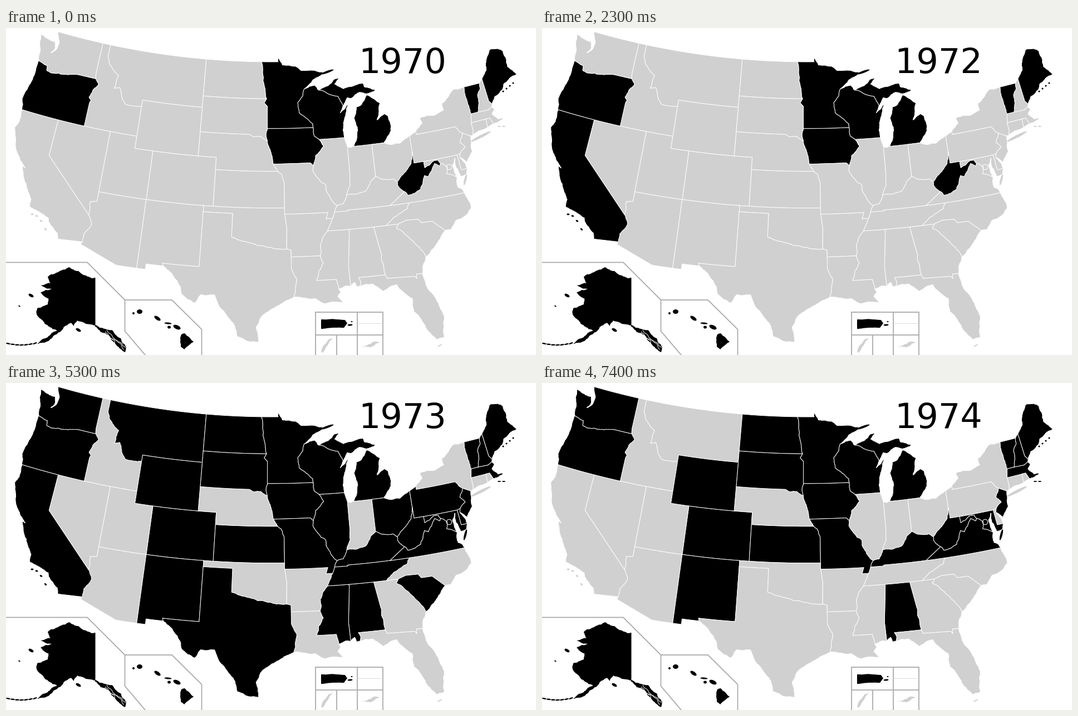
A matplotlib script for the animation above (8000 ms loop, 952 by 588 pixels).

```python
import math
import random

import matplotlib.pyplot as plt
from matplotlib.animation import FuncAnimation
from matplotlib.patches import Circle, Ellipse, Polygon

W, H, DPI = 952, 588, 64
PX = 72 / DPI  # points per pixel
GREY, BLACK, FRAME = "#d0d0d0", "#000000", "#aaaaaa"

rng = random.Random(7)
arcs = []    # (state codes, pixel points) pieces of border or coast
shapes = []  # (state code, patch)

fig = plt.figure(figsize=(W / DPI, H / DPI), dpi=DPI, facecolor="white")
ax = fig.add_axes([0, 0, 1, 1])
ax.set_xlim(0, W)
ax.set_ylim(H, 0)
ax.axis("off")

# Albers equal-area conic with the usual parallels for the lower 48 states
S1, S2 = (math.sin(math.radians(a)) for a in (29.5, 45.5))
CONE = (S1 + S2) / 2


def project(west, north):
    """Degrees west and north to stage pixels."""
    sin_lat = math.sin(math.radians(north))
    r = 1251 * math.sqrt(1 + S1 * S2 - 2 * CONE * sin_lat) / CONE
    turn = CONE * math.radians(96 - west)
    return 476.5 + r * math.sin(turn), -1317.6 + r * math.cos(turn)


def pairs(xy):
    return list(zip(xy[::2], xy[1::2]))


def split(a, b, k):
    """Midpoint displacement from a to b, leaving out a."""
    if math.dist(a, b) < 3:
        return [b]
    d = rng.uniform(-k, k)
    mid = ((a[0] + b[0]) / 2 - d * (b[1] - a[1]),
           (a[1] + b[1]) / 2 + d * (b[0] - a[0]))
    return split(a, mid, k) + split(mid, b, k)


def rough(pts, k):
    out = [pts[0]]
    for a, b in zip(pts, pts[1:]):
        out += split(a, b, k)
    return out


def edge(codes, *degrees, k=0):
    pts = [project(*p) for p in pairs(degrees)]
    arcs.append((codes.split(), rough(pts, k)))


def wavy(codes, *degrees):
    edge(codes, *degrees, k=0.08)


def runs(stops):
    return zip(stops[::2], stops[1::2], stops[2::2])


def parallel(lat, *stops):
    for a, codes, b in runs(stops):
        pts = [project(a + (b - a) * i / 12, lat) for i in range(13)]
        arcs.append((codes.split(), pts))


def meridian(lon, *stops):
    for a, codes, b in runs(stops):
        edge(codes, lon, a, lon, b)


def ring(code):
    """Chain every arc of a state into one outline."""
    parts = [pts for codes, pts in arcs if code in codes]
    path = list(parts.pop(0))
    while parts:
        end = path[-1]
        part = min(parts, key=lambda p: min(math.dist(end, p[0]),
                                            math.dist(end, p[-1])))
        parts.remove(part)
        if math.dist(end, part[0]) > math.dist(end, part[-1]):
            part = part[::-1]
        path += part
    return path


def add(code, patch):
    shapes.append((code, ax.add_patch(patch)))


def land(code, *xy, k=0.08):
    add(code, Polygon(rough(pairs(xy), k), lw=0, zorder=2))


def isle(code, x, y, w, h, tilt=0):
    add(code, Ellipse((x, y), w, h, angle=tilt, lw=0, zorder=2))


def stroke(color, width, *xy, k=0):
    x, y = zip(*rough(pairs(xy), k))
    ax.plot(x, y, color=color, lw=width * PX, zorder=3,
            solid_joinstyle="miter", solid_capstyle="butt")


# Borders along parallels
parallel(49, 122.75, "wa", 117.03, "id", 116.05, "mt", 104.05, "nd", 97.23,
         "mn", 95.15)
parallel(45.94, 104.05, "nd sd", 96.56)
parallel(46, 118.98, "wa or", 116.92)
parallel(45.01, 73.34, "vt", 71.5)
parallel(45, 111.05, "mt wy", 104.05)
parallel(43.5, 96.45, "ia mn", 91.22)
parallel(43, 104.05, "sd ne", 98.5)
parallel(42.74, 73.27, "vt ma", 72.46)
parallel(42.5, 90.64, "wi il", 87.8)
parallel(42.03, 73.5, "ma ct", 71.8, "ma ri", 71.38)
parallel(42, 124.21, "or ca", 120, "or nv", 117.03, "nv id", 114.05, "id ut",
         111.05)
parallel(42, 79.76, "ny pa", 75.35)
parallel(41.72, 86.82, "in mi", 84.81, "mi oh", 83.45)
parallel(41, 111.05, "ut wy", 109.05, "wy co", 104.05, "ne co", 102.05)
parallel(41, 73.9, "ny", 73.65)
parallel(40, 102.05, "ne ks", 95.31)
parallel(39.72, 80.52, "wv pa", 79.48, "pa md", 75.79)
parallel(38.46, 75.69, "md de", 75.05)
parallel(37, 114.05, "ut az", 109.05, "co nm", 103.03, "co ok", 102.05,
         "ks ok", 94.62)
parallel(36.58, 88.07, "ky tn", 83.68, "tn va", 81.68, "va nc", 75.87)
parallel(36.5, 103.03, "ok tx", 100)
parallel(36.5, 94.62, "mo ar", 90.15)
parallel(36.5, 89.45, "ky tn", 88.07)
parallel(36, 90.37, "mo ar", 89.7)
parallel(35, 90.3, "ms tn", 88.2, "al tn", 85.6, "tn ga", 84.32, "ga nc", 83.1)
parallel(33, 94.04, "ar la", 91.16)
parallel(32, 106.62, "nm tx", 103.05)
parallel(31.78, 108.21, "nm", 106.53)
parallel(31.33, 111.07, "az", 109.05, "nm", 108.21)
parallel(31, 91.63, "ms la", 89.73)
parallel(31, 87.6, "al fl", 85)

# Borders along meridians
meridian(120, 42, "ca nv", 39)
meridian(117.03, 49, "wa id", 46.4)
meridian(117.03, 43.8, "or id", 42)
meridian(116.05, 49, "id mt", 48)
meridian(114.05, 42, "nv ut", 37, "nv az", 36.2)
meridian(111.05, 45, "mt wy", 44.47, "id wy", 42, "ut wy", 41)
meridian(109.05, 41, "ut co", 37, "az nm", 31.33)
meridian(108.21, 31.78, "nm", 31.33)
meridian(104.05, 49, "mt nd", 45.94, "mt sd", 45, "wy sd", 43, "wy ne", 41)
meridian(103.04, 37, "nm ok", 36.5, "nm tx", 32)
meridian(102.05, 41, "ne co", 40, "co ks", 37)
meridian(100, 36.5, "ok tx", 34.56)
meridian(96.45, 45.3, "sd mn", 43.5)
meridian(94.62, 39.11, "ks mo", 37, "ok mo", 36.5)
meridian(94.04, 33.55, "ar tx", 33, "la tx", 32)
meridian(87.53, 41.71, "il in", 39.35)
meridian(84.81, 41.72, "in oh", 39.1)
meridian(80.52, 41.98, "oh pa", 40.64, "wv pa", 39.72)
meridian(79.76, 42.27, "ny pa", 42)
meridian(79.48, 39.72, "wv md", 39.2)

# Slanting borders
edge("ca nv", 120, 39, 114.63, 35)
edge("ca", 117.12, 32.53, 114.72, 32.72)
edge("az", 114.72, 32.72, 114.81, 32.5, 111.07, 31.33)
edge("nm tx", 106.53, 31.78, 106.62, 32)
edge("sd mn", 96.45, 45.3, 96.84, 45.6, 96.56, 45.94)
edge("ok ar", 94.48, 33.64, 94.43, 35.39, 94.62, 36.5)
edge("ar tx", 94.04, 33.55, 94.48, 33.64)
edge("mo ar", 90.37, 36, 90.15, 36.5)
edge("ia mo", 95.77, 40.58, 91.73, 40.61, 91.42, 40.38)
edge("il", 87.8, 42.5, 87.53, 41.71)
edge("va ky", 83.68, 36.58, 81.97, 37.54)
edge("ms al", 88.4, 30.35, 88.47, 31.9, 88.1, 34.9, 88.2, 35)
edge("al ga", 85.6, 35, 85.18, 32.87)
edge("ga fl", 85, 31, 84.86, 30.7, 82.2, 30.57)
edge("nc sc", 83.1, 35, 82.3, 35.2, 81.04, 35.15, 80.78, 34.82, 79.67, 34.8,
     78.55, 33.86)
edge("md de", 75.79, 39.72, 75.69, 38.46)
edge("nj ny", 74.7, 41.36, 73.9, 41)
edge("ny ma", 73.27, 42.74, 73.5, 42.03)
edge("ny ct", 73.5, 42.03, 73.5, 41.3, 73.65, 41)
edge("nh me", 71.08, 45.3, 70.98, 43.4, 70.7, 43.07)
edge("nh ma", 72.46, 42.74, 71.3, 42.7, 70.82, 42.87)
edge("ma ri", 71.12, 41.5, 71.38, 42.03)
edge("ct ri", 71.8, 42.03, 71.85, 41.32)

# Rivers and ridges
wavy("wa id", 117.03, 46.4, 116.92, 46)
wavy("wa or", 118.98, 46, 120.65, 45.73, 122.2, 45.56, 122.76, 45.65,
     122.85, 46.05, 124, 46.25)
wavy("or id", 116.92, 46, 116.47, 45.6, 117.22, 44.4, 116.93, 44.2,
     117.03, 43.8)
wavy("ca az", 114.63, 35, 114.14, 34.3, 114.72, 33.4, 114.72, 32.72)
wavy("nv az", 114.63, 35, 114.72, 36.08, 114.05, 36.2)
wavy("id mt", 116.05, 48, 115.7, 47.45, 114.35, 46.65, 114.55, 45.56,
     113.95, 45.7, 113, 44.45, 111.05, 44.47)
wavy("ok tx", 100, 34.56, 98.1, 34.13, 96.6, 33.85, 94.48, 33.64)
wavy("ks mo", 94.62, 39.11, 94.9, 39.75, 95.31, 40)
wavy("ne mo", 95.31, 40, 95.77, 40.58)
wavy("ne ia", 95.77, 40.58, 96.1, 41.7, 96.45, 42.49)
wavy("sd ia", 96.45, 42.49, 96.6, 43, 96.45, 43.5)
wavy("sd ne", 98.5, 43, 97.9, 42.8, 97.2, 42.85, 96.45, 42.49)
wavy("nd mn", 96.56, 45.94, 96.8, 46.9, 97.23, 49)
wavy("mn wi", 92.05, 46.7, 92.29, 46.1, 92.88, 45.6, 92.75, 44.75, 91.25, 43.8,
     91.22, 43.5)
wavy("wi ia", 91.22, 43.5, 91.1, 42.75, 90.64, 42.5)
wavy("ia il", 90.64, 42.5, 90.16, 41.9, 91.1, 41.2, 91.42, 40.38)
wavy("il mo", 91.42, 40.38, 91.5, 40, 90.7, 39, 90.2, 38.75, 90.2, 38.3,
     89.52, 37.3, 89.15, 37)
wavy("il ky", 89.15, 37, 88.5, 37.1, 88.05, 37.82)
wavy("il in", 87.53, 39.35, 87.6, 38.6, 88.05, 37.82)
wavy("in ky", 88.05, 37.82, 87.1, 37.8, 86, 38, 85.42, 38.7, 84.81, 39.1)
wavy("oh ky", 84.81, 39.1, 84.2, 38.8, 83, 38.7, 82.59, 38.42)
wavy("oh wv", 82.59, 38.42, 81.8, 39, 80.85, 39.7, 80.52, 40.64)
wavy("wi mu", 90.42, 46.56, 89.1, 46.13, 88.1, 45.9, 87.6, 45.1)
wavy("ky mo", 89.15, 37, 89.45, 36.5)
wavy("mo tn", 89.45, 36.5, 89.7, 36)
wavy("ar tn", 89.7, 36, 90.3, 35)
wavy("ar ms", 90.3, 35, 91.1, 33.95, 91.16, 33)
wavy("ms la", 91.16, 33, 90.9, 32.4, 91.63, 31)
wavy("ms la", 89.73, 31, 89.55, 30.18)
wavy("la tx", 94.04, 32, 93.55, 31.2, 93.7, 30.1, 93.85, 29.7)
wavy("al ga", 85.18, 32.87, 85.05, 31.6, 85, 31)
wavy("al fl", 87.6, 31, 87.4, 30.65, 87.52, 30.28)
wavy("ga fl", 82.2, 30.57, 82.05, 30.36, 82, 30.75, 81.45, 30.71)
wavy("ga sc", 80.85, 32.03, 81.5, 33, 81.95, 33.5, 83.35, 34.7, 83.1, 35)
wavy("tn nc", 81.68, 36.58, 82, 36.1, 83.5, 35.57, 84.32, 35)
wavy("wv ky", 82.59, 38.42, 82.6, 38.1, 81.97, 37.54)
wavy("va wv", 81.97, 37.54, 81.68, 37.2, 80.3, 37.5, 79.65, 38.58,
     79.25, 38.42, 78.35, 39.4, 77.83, 39.13, 77.72, 39.32)
wavy("wv md", 79.48, 39.2, 78.4, 39.62, 77.9, 39.6, 77.72, 39.32)
wavy("va md", 77.72, 39.32, 77.1, 38.95, 77.3, 38.4, 76.3, 37.95)
wavy("pa de", 75.79, 39.72, 75.41, 39.8)
wavy("pa nj", 75.41, 39.8, 74.75, 40.2, 75.2, 40.7, 74.7, 41.36)
wavy("ny pa", 75.35, 42, 75.05, 41.6, 74.7, 41.36)
wavy("ny vt", 73.34, 45.01, 73.4, 44.1, 73.27, 42.74)
wavy("vt nh", 71.5, 45.01, 71.6, 44.5, 72.05, 44.1, 72.46, 42.74)

# Coasts and national borders
wavy("wa", 124, 46.25, 124.15, 47, 124.7, 48.38, 122.75, 48.14, 122.55, 47.6,
     122.9, 47.15, 122.4, 47.5, 122.25, 48.2, 122.75, 49)
wavy("or", 124.21, 42, 124.55, 42.84, 124.07, 44.6, 124, 46.25)
wavy("ca", 124.21, 42, 124.1, 41, 124.4, 40.44, 123.7, 38.95, 122.5, 37.8,
     122.1, 37.5, 122.45, 37.6, 121.9, 36.6, 120.65, 35.15, 120.62, 34.55,
     118.5, 34.03, 118.4, 33.75, 117.3, 33, 117.12, 32.53)
wavy("mn", 95.15, 49, 95.15, 49.38, 94.6, 48.72, 93, 48.6, 92.4, 48.25,
     89.6, 48, 92.05, 46.7)
wavy("wi", 92.05, 46.7, 90.75, 46.95, 90.42, 46.56)
wavy("wi", 87.6, 45.1, 88, 44.55, 86.97, 45.28, 87.75, 43.7, 87.8, 42.5)
wavy("mu", 90.42, 46.56, 89.2, 46.85, 88.4, 47.35, 87.75, 47.45, 88.4, 46.95,
     87.4, 46.5, 86.1, 46.67, 85, 46.77, 84.9, 46.48, 83.6, 46.1, 84.75, 45.88,
     85.5, 46.08, 86.6, 45.65, 87.05, 45.75, 87.6, 45.1)
wavy("mi", 83.45, 41.72, 82.5, 42.6, 82.6, 43.85, 82.95, 44.07, 83.9, 43.65,
     83.3, 45, 84.75, 45.78, 85.55, 45, 86.1, 44.9, 86.5, 44, 86.2, 43,
     86.82, 41.72)
wavy("in", 87.53, 41.71, 87.2, 41.63, 86.82, 41.72)
wavy("oh", 83.45, 41.72, 82.7, 41.5, 81.7, 41.5, 80.52, 41.98)
wavy("pa", 80.52, 41.98, 79.76, 42.27)
wavy("ny", 79.76, 42.27, 78.9, 42.8, 79.05, 43.27, 77.5, 43.27, 76.2, 43.55,
     76.3, 44.1, 74.7, 45, 73.34, 45.01)
wavy("nh", 71.5, 45.01, 71.08, 45.3)
wavy("me", 71.08, 45.3, 70.3, 45.9, 70, 46.7, 69.23, 47.46, 68.3, 47.35,
     67.8, 47.07, 67.79, 45.7, 67, 44.85, 68.8, 44.4, 69.1, 44, 70.2, 43.6,
     70.7, 43.07)
wavy("nh", 70.7, 43.07, 70.82, 42.87)
wavy("ma", 70.82, 42.87, 70.6, 42.65, 71, 42.3, 70.5, 41.77, 70, 41.78,
     70.2, 42.07, 69.95, 41.65, 71.12, 41.5)
wavy("ri", 71.12, 41.5, 71.4, 41.45, 71.85, 41.32)
wavy("ct", 71.85, 41.32, 72.9, 41.25, 73.65, 41)
wavy("nj", 73.9, 41, 74, 40.4, 74.1, 39.75, 74.9, 38.95, 75.55, 39.5,
     75.41, 39.8)
wavy("de", 75.41, 39.8, 75.55, 39.45, 75.1, 38.8, 75.05, 38.46)
wavy("md", 75.05, 38.46, 75.25, 38.03, 75.9, 37.95, 76.2, 38.8, 76.1, 39.5,
     76.5, 39, 76.45, 38.4, 76.3, 37.95)
wavy("va", 76.3, 37.95, 76.4, 37.1, 76, 36.9, 75.87, 36.58)
wavy("nc", 75.87, 36.58, 75.5, 35.25, 76.5, 34.65, 77.3, 34.5, 77.95, 33.87,
     78.55, 33.86)
wavy("sc", 78.55, 33.86, 79.15, 33.3, 79.9, 32.65, 80.85, 32.03)
wavy("ga", 80.85, 32.03, 81.3, 31.3, 81.45, 30.71)
wavy("fl", 81.45, 30.71, 80.55, 28.45, 80.05, 26.9, 80.4, 25.2, 81.1, 25.13,
     81.75, 25.95, 82.75, 27.7, 82.75, 28.8, 84.05, 30.1, 85.35, 29.68,
     86.3, 30.38, 87.52, 30.28)
wavy("al", 87.52, 30.28, 87.85, 30.25, 88, 30.65, 88.4, 30.35)
wavy("ms", 88.4, 30.35, 88.9, 30.4, 89.55, 30.18)
wavy("la", 89.55, 30.18, 89.4, 29.9, 89.7, 29.55, 89.15, 29.05, 90.1, 29.15,
     90.9, 29.05, 91.8, 29.5, 93.85, 29.7)
wavy("tx", 93.85, 29.7, 94.75, 29.35, 97, 28, 97.4, 27.2, 97.15, 25.95)
wavy("tx", 97.15, 25.95, 99.1, 26.4, 99.5, 27.5, 100.3, 28.3, 101.4, 29.77,
     102.7, 29.7, 103.2, 28.98, 104.5, 29.65, 105, 30.65, 106.53, 31.78)

for c in sorted({c for names, _ in arcs for c in names}):
    add(c, Polygon(ring(c), ec="white", lw=0.95 * PX, joinstyle="round"))

# Offshore islands
isle("mi", 577, 79, 24, 4, -20)
isle("ny", 853, 195, 40, 5, -27)
isle("va", 825, 273, 4, 20, 14)
isle("fl", 779, 571, 10, 2, -30)
for i in range(4):
    isle("ca", 47 + 8 * i, 335 + 3 * i * i, 5, 3, 15 * i)
    isle("me", 893 + 6 * i, 114 - 5 * i, 3, 3)
for x in (886, 894):
    isle("ma", x, 177, 6, 2)

# Alaska
land("ak", 160.5, 535, 138, 529, 128, 526, 122, 536, 117, 530, 92, 550,
     56, 568, 92, 544, 66, 526, 55, 514, 56, 504, 75, 497, 76, 486, 62, 476,
     82, 470, 62, 463, 80, 459, 75, 448, 90, 440, 113, 430, 130, 437,
     160.5, 449, k=0.12)
land("ak", 160, 534, 178, 541, 190, 543, 206, 558, 216, 574, 214, 583, 198, 570,
     184, 552, 160, 537, k=0.12)
for i in range(7):
    isle("ak", 52 - 8 * i, 567 + 3 * math.sin(i / 2), 8, 2.5, 5 * i - 20)
for x, y, size in [(45, 481, 10), (24, 500, 4), (65, 514, 6), (130, 543, 10)]:
    isle("ak", x, y, size, size / 2, 30)
for d in (-3, 0, 3):
    stroke("white", 0.9, 178 + d, 546 - d, 212 + d, 578 - d, k=0.15)

# Hawaii
for x, y, w, h, tilt in [(229, 513, 4, 4, 0), (240, 510, 10, 8, 0),
                         (272, 522, 13, 6, 35), (291, 531, 13, 3, 5),
                         (293, 538, 6, 5, 0), (307, 538, 14, 7, 25)]:
    isle("hi", x, y, w, h, tilt)
land("hi", 315, 551, 321, 549, 337, 564, 320, 578, 314, 573, 313, 557)

# Territories
land("pr", 566, 524, 609, 525, 613, 531, 607, 539, 566, 541, 566, 524, k=0.03)
isle("pr", 618, 534, 9, 3, -5)
isle("pr", 621, 528, 3, 2)
land("gu", 566, 582, 569, 573, 579, 560, 587, 557, 578, 570, 569, 584)
land("as", 638, 572, 655, 568, 661, 564, 671, 565, 655, 574)

# Barrier island and federal district
stroke("white", 0.9, 470, 516, 458, 526, 453, 540, 452, 556, k=0.05)
ax.add_patch(Circle((796, 250), 4.7, fill=False, ec="white", lw=PX, zorder=4))

# Inset frames
for pts in [(0, 421.5, 146, 421.5, 213.5, 489, 298, 489, 351.5, 542, 351.5, 588),
            (213.5, 489, 213.5, 545, 250, 588),
            (556, 589, 556, 511, 677, 511, 677, 589),
            (556, 551.5, 677, 551.5), (630.5, 511, 630.5, 588),
            (593.5, 551.5, 593.5, 588)]:
    stroke(FRAME, 1.8, *pts)
stroke("#dcdcdc", 1, 632, 530.5, 676, 530.5)

year = ax.text(633.2, 80.5, "", family="DejaVu Sans", size=62 * PX,
               va="baseline", ha="left", color=BLACK)

base = "or mn wi mi mu ia vt me wv ak hi pr "
wide = base + "wa nd sd wy co nm ks mo ky va md nj ma nh al "
steps = [  # first tick, label, dark states
    (0, "1970", base),
    (1, "1972", base + "ca"),
    (7, "1973", wide + "ca mt tx il oh pa de tn ms sc"),
    (13, "1974", wide),
]


def draw(tick):
    _, label, names = [s for s in steps if s[0] <= tick][-1]
    dark = set(names.split())
    year.set_text(label)
    for code, patch in shapes:
        patch.set_facecolor(BLACK if code in dark else GREY)
    return [year]


anim = FuncAnimation(fig, draw, frames=16, interval=500, repeat=True,
                     repeat_delay=0)
plt.show()
```
